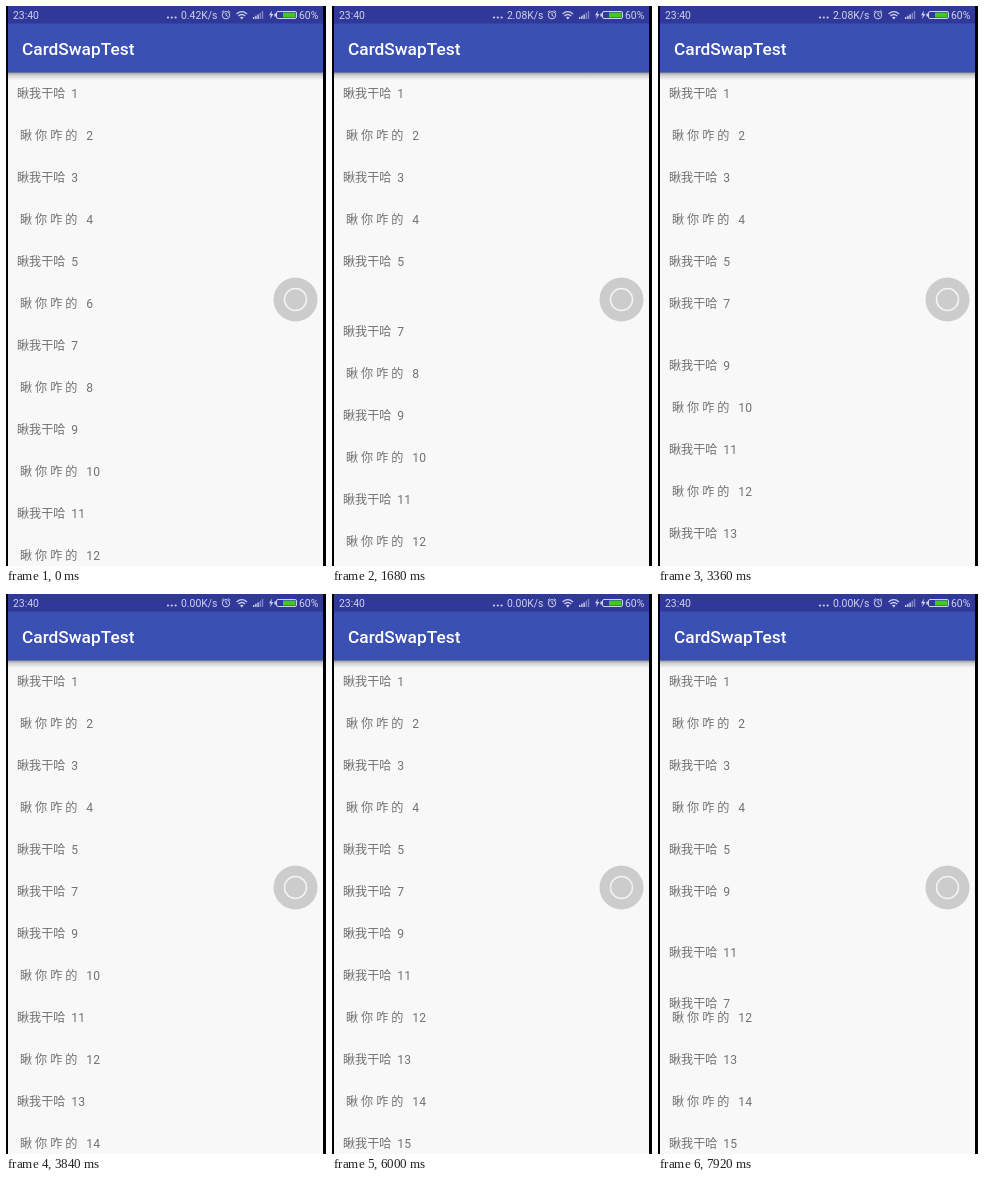
These frames come from a looping animation (320x560 px, 8000 ms). An HTML page:

```html
<!DOCTYPE html>
<html lang="zh-CN">
<head>
<meta charset="utf-8">
<title>List</title>
<style>
  html, body { margin: 0; width: 100%; height: 100%; overflow: hidden; background: #000; }
  svg { display: block; width: 320px; height: 560px; }
  text { font-family: Roboto, "Noto Sans CJK SC", "Noto Sans CJK", sans-serif; white-space: pre; }
  #rows text { font-size: 12.1px; fill: #727272; }
  .title { font-size: 17.3px; font-weight: 500; fill: #fff; }
  .status text { font-size: 10.4px; fill: #cfd2ec; }
  .line { fill: none; stroke: #cfd2ec; }
  .solid { fill: #cfd2ec; }
</style>
</head>
<body>
<svg viewBox="0 0 320 560">
  <defs>
    <linearGradient id="shade" x2="0" y2="1">
      <stop offset="0" stop-color="#000" stop-opacity=".42"/>
      <stop offset=".4" stop-color="#000" stop-opacity=".16"/>
      <stop offset="1" stop-color="#000" stop-opacity="0"/>
    </linearGradient>
  </defs>
  <rect width="320" height="560" fill="#f8f8f8"/>
  <g id="rows"></g>

  <rect y="66" width="320" height="8" fill="url(#shade)"/>
  <rect y="17" width="320" height="49.5" fill="#3a50b2"/>
  <rect width="320" height="17.5" fill="#30399a"/>
  <text class="title" x="16" y="49">CardSwapTest</text>

  <g class="status">
    <text x="7" y="13">23:40</text>
    <g class="solid">
      <circle cx="162" cy="11.5" r="1.1"/>
      <circle cx="165.8" cy="11.5" r="1.1"/>
      <circle cx="169.6" cy="11.5" r="1.1"/>
    </g>
    <text id="speed" x="175" y="13"></text>
    <g class="line">
      <circle cx="220" cy="9.2" r="3.7"/>
      <path d="M220 7v2.4l1.7 1M215.8 6.4l2-1.9M224.2 6.4l-2-1.9"/>
      <path d="M230.6 8q5.2-4.6 10.4 0M232.4 10q3.4-3 6.8 0" stroke-width="1.2"/>
    </g>
    <path class="solid" d="M234 11.4q1.8-1.4 3.6 0l-1.8 2z"/>
    <path class="solid" d="M247 11h1.4v2H247zM249.2 9.7h1.4V13h-1.4zM251.4 8.4h1.4V13h-1.4z"/>
    <path class="solid" opacity=".5" d="M253.6 6.8h1.4V13h-1.4zM255.8 5h1.4v8h-1.4z"/>
    <path class="solid" d="M266 4.5l-3 4.8h1.9l-.9 4 3.4-5.2h-2z"/>
    <rect class="line" x="270.5" y="5.5" width="20" height="7" rx="1.5"/>
    <rect class="solid" x="268.4" y="7.5" width="1.6" height="3"/>
    <rect x="277" y="6.5" width="12.5" height="5" fill="#45c81c"/>
    <text x="293" y="13">60%</text>
  </g>

  <circle cx="289.5" cy="293.5" r="22" fill="#000" fill-opacity=".175"/>
  <circle cx="289.5" cy="293.5" r="11" fill="none" stroke="#f4f4f4" stroke-width="1.5"/>
  <path d="M0 0h2v560H0zM317 0h3v560h-3z"/>
</svg>
<script>
const LOOP = 8000, STEP = 240, ROW = 42, COUNT = 16;

// Dismissed rows: swipe start, swipe end, start of the collapse
const dismissed = {
  6: [150, 700, 1582],
  8: [2060, 2620, 1 * 3230],
  10: [3900, 4300, 5147]
};
// Rows that make room for the dragged one
const shifted = { 9: 7110, 11: 7787 };
const DRAGGED = 7;
const drag = [[6300, 0], [6480, 6], [6720, 16], [6960, 30], [7200, 50], [7440, 76], [7680, 90], [7920, 112]];

const clamp = v => Math.min(1, Math.max(0, v));
const ease = (t, start, span = 250) => (1 - Math.cos(Math.PI * clamp((t - start) / span))) / 2;

function dragAt(t) {
  if (t <= drag[0][0]) return 0;
  const i = drag.findIndex(p => p[0] >= t);
  if (i < 0) return drag[drag.length - 1][1];
  const [t0, y0] = drag[i - 1], [t1, y1] = drag[i];
  return y0 + (y1 - y0) * (t - t0) / (t1 - t0);
}

const group = document.getElementById('rows');
const speed = document.getElementById('speed');
const rows = Array.from({ length: COUNT }, (_, i) => {
  const n = i + 1;
  const row = document.createElementNS('http://www.w3.org/2000/svg', 'text');
  row.textContent = n % 2 ? `瞅我干哈  ${n}` : ` 瞅 你 咋 的   ${n}`;
  return group.appendChild(row);
});

function render(t) {
  let top = 92;
  rows.forEach((row, i) => {
    const n = i + 1, gone = dismissed[n];
    let x = 11, y = top;
    top += ROW;
    if (gone) {
      const [start, end, collapse] = gone;
      x += 320 * ease(t, start, end - start);
      top -= ROW * ease(t, collapse);
      row.setAttribute('visibility', t >= end ? 'hidden' : 'visible');
    }
    if (shifted[n]) y -= ROW * ease(t, shifted[n]);
    if (n === DRAGGED) y += dragAt(t);
    row.setAttribute('transform', `translate(${x.toFixed(1)} ${Math.round(y)})`);
  });
  speed.textContent = (t < 480 ? '0.42' : t < 3840 ? '2.08' : '0.00') + 'K/s';
}

const origin = performance.now();
function tick() {
  const t = (performance.now() - origin) % LOOP;
  render(Math.floor(t / STEP) * STEP);
  requestAnimationFrame(tick);
}
tick();
</script>
</body>
</html>
```
